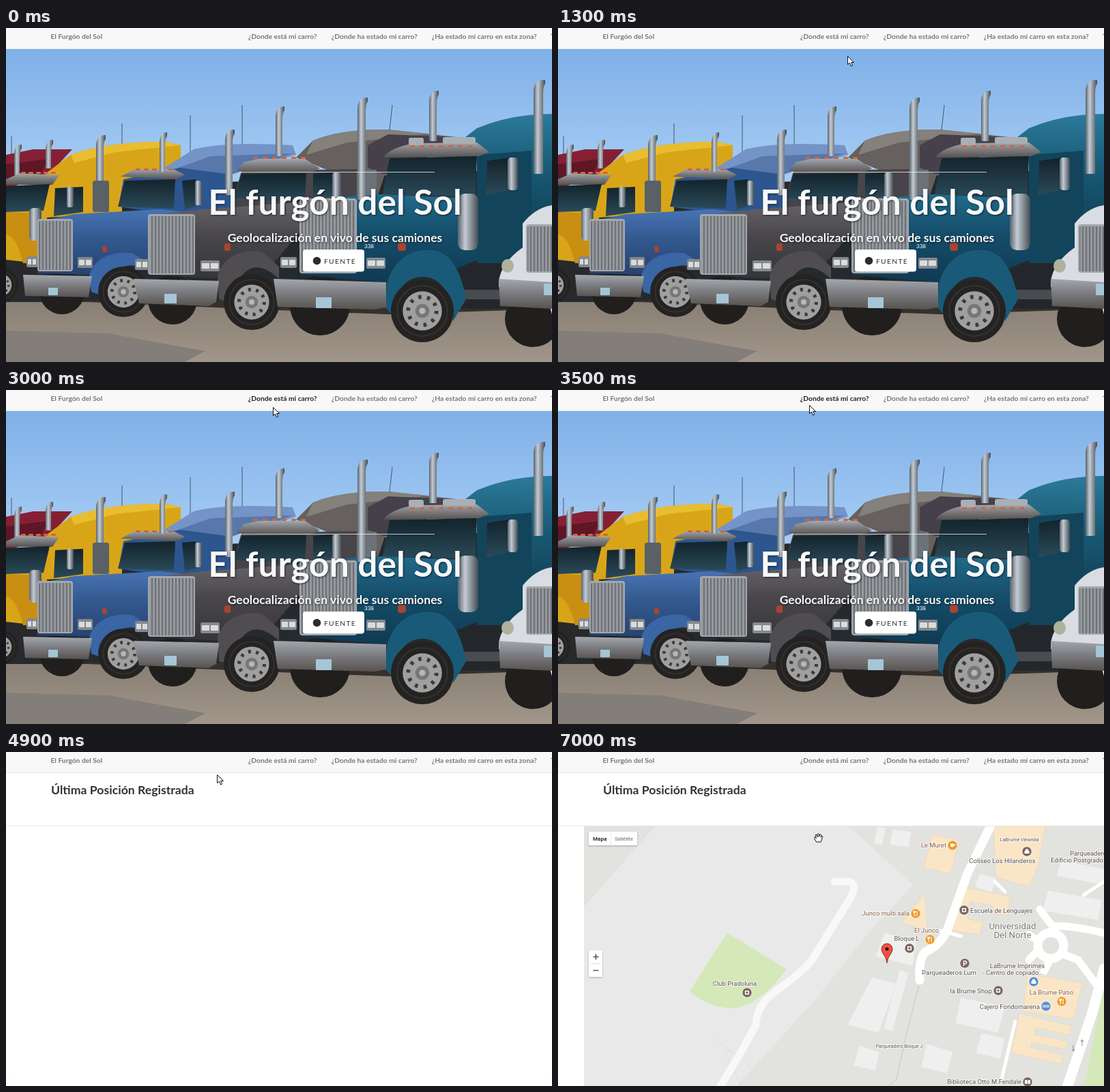
These frames come from a looping animation (800x490 px, 7100 ms). An HTML page:

```html
<!DOCTYPE html>
<html lang="es">
<head>
<meta charset="utf-8">
<title>Geolocalización</title>
<style>
  html, body { margin: 0; width: 100%; height: 100%; overflow: hidden; background: #fff; }
  svg { display: block; }
  text { font-family: Lato, sans-serif; font-weight: 700; }
  .nav text { font-size: 10.25px; fill: #777; }
  .intro { fill: #f8f8f8; text-anchor: middle; filter: drop-shadow(1.5px 1.5px 1.5px rgba(0,0,0,.6)); }
  .ui text { font: 500 8.1px Roboto, sans-serif; }
  .box { fill: #fff; filter: drop-shadow(0 1px 1px rgba(0,0,0,.28)); }
  #labels text { font-family: Roboto, sans-serif; font-weight: 400; paint-order: stroke; stroke: #fff; stroke-width: 2px; stroke-opacity: .75; stroke-linejoin: round; }
  .road { fill: none; stroke: #fff; stroke-linecap: round; stroke-linejoin: round; }
  #cursor path { fill: #fff; stroke: #111; stroke-width: 1; stroke-linejoin: round; }
</style>
</head>
<body>
<svg width="800" height="490" viewBox="0 0 800 490">
  <defs>
    <linearGradient id="sky" x2="0" y2="1">
      <stop stop-color="#7fb0e9"/><stop offset=".45" stop-color="#a3caf2"/><stop offset="1" stop-color="#c2ddf4"/>
    </linearGradient>
    <linearGradient id="soil" x2="0" y2="1">
      <stop stop-color="#857b70"/><stop offset="1" stop-color="#a2968a"/>
    </linearGradient>
    <linearGradient id="pipe">
      <stop stop-color="#59626b"/><stop offset=".35" stop-color="#c3ccd4"/><stop offset="1" stop-color="#454c53"/>
    </linearGradient>
    <linearGradient id="chrome" x2="0" y2="1">
      <stop stop-color="#a3a7ad"/><stop offset=".45" stop-color="#7d7e82"/><stop offset="1" stop-color="#57524f"/>
    </linearGradient>
    <linearGradient id="glass" x2="0" y2="1">
      <stop stop-color="#13232b"/><stop offset="1" stop-color="#2a4a59"/>
    </linearGradient>
    <linearGradient id="blueHood" x2="0" y2="1">
      <stop stop-color="#4873b4"/><stop offset=".45" stop-color="#33598f"/><stop offset="1" stop-color="#28436f"/>
    </linearGradient>
    <linearGradient id="grayHood" x2="0" y2="1">
      <stop stop-color="#66646a"/><stop offset=".45" stop-color="#48464a"/><stop offset="1" stop-color="#363538"/>
    </linearGradient>
    <linearGradient id="tealHood" x2="0" y2="1">
      <stop stop-color="#226b8c"/><stop offset=".45" stop-color="#154d6a"/><stop offset="1" stop-color="#0f3a53"/>
    </linearGradient>
    <linearGradient id="tealRoof" x2="0" y2="1">
      <stop stop-color="#2b7a9a"/><stop offset=".5" stop-color="#185872"/><stop offset="1" stop-color="#123f54"/>
    </linearGradient>
    <pattern id="bars" width="5" height="8" patternUnits="userSpaceOnUse">
      <path fill="#95989d" d="M0 0h5v8H0z"/><path fill="#6d7075" d="M3 0h2v8H3z"/>
    </pattern>
  </defs>

  <g id="home">
    <g id="photo"></g>
    <path d="M342 211.5H628" stroke="#f8f8f8" stroke-opacity=".75"/>
    <text class="intro" x="482" y="274" font-size="51.5">El furgón del Sol</text>
    <text class="intro" x="482" y="314" font-size="17.6">Geolocalización en vivo de sus camiones</text>
    <rect x="435" y="325" width="90" height="32.5" rx="4" fill="#fff"/>
    <circle cx="455.5" cy="341.5" r="5.8" fill="#2d2d2d"/>
    <text x="466" y="346" font-size="10.3" letter-spacing="1.3" style="font-weight:400" fill="#333">FUENTE</text>
  </g>

  <g id="page">
    <path fill="#fff" d="M0 30h800v460H0z"/>
    <text x="66" y="62" font-size="17.66" fill="#333">Última Posición Registrada</text>
    <path d="M0 108.5H800" stroke="#e8e8e8"/>
    <g id="map">
      <path fill="#e5e3df" d="M38 109h762v381H38z"/>
      <svg x="38" y="109" width="762" height="381" viewBox="38 109 762 381">
        <g id="tiles">
          <path fill="#e2e2de" d="M38 109h762v381H38z"/>
          <path fill="#e9e9e9" d="M141 109H426L520 195L455 265L380 360L262 490H38V226Z"/>
          <path fill="#d5e8b8" d="M248 265L335 319Q290 378 250 376Q216 372 193 351ZM800 345V490H771Z"/>
          <g fill="none" stroke="#dededc"><path d="M141 109L38 226M228 420L320 490M245 440L268 490"/></g>
          <g id="blocks"></g>
          <g class="road">
            <path stroke="#f8f8f8" stroke-width="11" d="M405 190H425Q440 192 428 215L372 305Q362 320 320 350Q290 372 290 400Q275 430 238 490"/>
            <path stroke-width="13" d="M636 104L600 178L570 262Q558 285 540 292Q528 300 530 335"/>
            <path stroke-width="15" d="M800 318Q792 350 782 385L745 495"/>
            <path stroke-width="11" d="M706 231L724 255Q760 255 805 267M690 268L705 278M702 292L690 305M738 296L762 305L788 340M720 306L712 322"/>
            <circle cx="722" cy="284" r="19" stroke-width="13"/>
            <path stroke-width="5" d="M800 190L770 210M640 190L655 205M560 262L590 270M670 395L650 480"/>
            <path stroke="#d0d0cd" stroke-width="1.5" d="M529 342L510 415L496 480L485 490"/>
          </g>
          <path d="M755 430v9m-2-3l2 3 2-3M768 431v-9m-2 3l2-3 2 3" fill="none" stroke="#888"/>
        </g>
        <g id="labels"></g>
      </svg>
      <g class="ui">
        <rect class="box" x="45" y="117" width="71" height="20" rx="1.5"/>
        <path d="M77.5 117v20" stroke="#e6e6e6"/>
        <text x="51" y="130" fill="#111">Mapa</text>
        <text x="83" y="130" style="font-weight:400" fill="#666">Satélite</text>
        <rect class="box" x="45" y="291" width="20" height="39" rx="1.5"/>
        <path d="M48 310.5h14" stroke="#e0e0e0"/>
        <path id="zoom" d="M51.5 300.5h8m-4-4v8M51.5 320.5h8" stroke="#555" stroke-width="1.7"/>
      </g>
      <g id="pin">
        <path d="M482 309.5Q481 302 477 297Q474 293 474 289A8 8 0 0 1 490 289Q490 293 487 297Q483 302 482 309.5Z" fill="#f4503e" stroke="#7c2a22" stroke-width=".9"/>
        <circle cx="482" cy="289" r="2.6" fill="#3a1512"/>
      </g>
    </g>
  </g>

  <g class="nav">
    <path fill="#f8f8f8" d="M0 0h800v30H0z"/>
    <path d="M0 30.5H800" stroke="#e7e7e7"/>
    <text x="65.5" y="16">El Furgón del Sol</text>
    <text id="link" x="354.7" y="16">¿Donde está mi carro?</text>
    <text x="476.7" y="16">¿Donde ha estado mi carro?</text>
    <text x="623.7" y="16">¿Ha estado mi carro en esta zona?</text>
    <text x="798" y="16">T</text>
  </g>

  <g id="cursor">
    <path id="arrow" d="M0 0V12L3 9.5L5 14.5L7.2 13.5L5.2 9H9Z"/>
    <path id="hand" d="M0 1.5Q0 0 1.2 0Q2.5 0 2.5 1.5V6Q4 5.3 5 6.6Q6.5 6 7.2 7.4Q9 7 9 9V12L7.6 16.5H1.4L-2.8 11Q-3.2 9.2-1.5 9.4L0 11Z"/>
    <path id="grab" d="M-3 6.5L-6 1Q-6-1.2-4-.3L-3.2 1L-4.4-3Q-4-5-2.5-4L-1.4-1V-5Q-.4-6.7 .8-5V-1L2-4.6Q3.6-5.6 4-3.8L3.6-.2L4.6-2.2Q6.4-2.8 6.2-1L4.5 4L3.5 6.5Z"/>
  </g>
</svg>

<script>
const $ = id => document.getElementById(id);
const shape = (fill, d) => `<path fill="${fill}" d="${d}"/>`;
const rect = (fill, x, y, w, h, r = 0) => `<rect fill="${fill}" x="${x}" y="${y}" width="${w}" height="${h}" rx="${r}"/>`;
const pipe = (x, y, w, h) => rect('url(#pipe)', x, y, w, h, w / 3);
// exhaust with its tip bent backwards
const stack = (x, y, w, h) => shape('url(#pipe)',
  `M${x} ${y + h}V${y + 16}Q${x} ${y} ${x + w + 1} ${y}V${y + 6}Q${x + w - 2} ${y + 9} ${x + w - 2} ${y + 20}V${y + h}Z`);
const chrome = d => shape('url(#chrome)', d);
const glass = d => shape('url(#glass)', d);
const grille = (x, y, w, h) => rect('#a4a8ad', x - 2, y - 3, w + 4, h + 5, 4) + rect('url(#bars)', x, y, w, h, 2);
const lamp = (x, y, w = 26) => rect('#85888c', x, y, w, 16, 2) +
  rect('#d8dcdc', x + 2, y + 4, w / 2 - 3, 8, 1) + rect('#d8dcdc', x + w / 2 + 1, y + 4, w / 2 - 3, 8, 1);
const plate = (x, y, w, h) => rect('#a5c6d6', x, y, w, h, 1);
const beacons = (x, y, n, gap) => Array.from({ length: n }, (_, i) => rect('#d0663a', x + i * gap, y, 7, 3, 1)).join('');
const wheel = (x, y, r) => `<g transform="translate(${x} ${y}) scale(${r / 40})">
  <circle r="40" fill="#242322"/><circle r="32" fill="none" stroke="#33312f" stroke-width="2"/>
  <circle r="25" fill="#a09f9f"/><circle r="18" fill="none" stroke="#3d3b3a" stroke-width="5" stroke-dasharray="4 7.3"/>
  <circle r="9" fill="#77777a"/><circle r="4" fill="#b7b8ba"/></g>`;
const tire = (x, y, r) => `<circle cx="${x}" cy="${y}" r="${r}" fill="#201f1e"/>`;

const backdrop = rect('url(#sky)', 0, 30, 800, 380) + rect('url(#soil)', 0, 390, 800, 100) +
  shape('#837e79', 'M0 444L150 448L292 474L262 490H0Z') +
  shape('#252a2e', 'M0 240L800 205V402H0Z') +
  shape('#35302c', 'M30 400H740V414L560 420L400 414L120 402Z') +
  '<path d="M8 158V190M170 140V190M270 128V205M346 113V205M566 113L558 185" stroke="#45566b" fill="none"/>';

const red = shape('#852034', 'M0 186L40 178H97L62 216L0 236Z') + shape('#5f1626', 'M0 200L62 192L50 216L0 226Z') +
  stack(12, 171, 10, 45) + stack(58, 164, 10, 42);

const yellow = shape('#d9a518', 'M60 212L95 186Q150 166 235 167L256 172V202L170 228V272L60 278V330L45 345L0 340V270Z') +
  shape('#e9bd30', 'M95 186Q150 166 235 167L256 172L160 182L100 198Z') +
  chrome('M0 222L20 213L78 216L68 230H0Z') + beacons(22, 211, 5, 11) +
  glass('M0 232L64 229L55 268L0 270Z') + glass('M72 235L113 233V270L70 276Z') +
  shape('#c98f12', 'M0 270L50 272V345H25Q15 305 0 303Z') + shape('#29292b', 'M0 345H46V394H0Z') +
  wheel(-8, 377, 26) + stack(132, 157, 13, 110) + rect('#596167', 127, 224, 24, 46, 3) + pipe(34, 264, 18, 48) + pipe(89, 233, 10, 30);

const blue = shape('#7494c8', 'M232 205L275 178Q320 166 420 172L425 186L330 215V240H250Z') +
  shape('#5877ab', 'M250 206L300 188L420 184L330 215V240H250Z') +
  shape('#2d568f', 'M165 262L172 222L255 205L330 215V272H230Z') +
  chrome('M168 218L188 207L245 207L262 215L250 222Z') + beacons(190, 206, 5, 12) +
  glass('M174 224L248 222L246 265L164 262Z') + glass('M258 224L278 222V262L262 266Z') + pipe(277, 224, 10, 36) +
  tire(82, 387, 33) +
  shape('url(#blueHood)', 'M46 284L100 273L225 266L262 270L212 310L208 345L190 342Q150 335 130 362L46 360Z') +
  shape('#3a66a6', 'M122 362Q135 326 185 330L210 345V356Q160 330 140 392L125 387Z') +
  wheel(172, 387, 37) + chrome('M25 362L126 364L121 395L28 393Z') + grille(48, 283, 48, 72) +
  lamp(30, 335, 16) + lamp(105, 336, 22) + plate(62, 381, 14, 11) + rect('#a84430', 141, 320, 7, 9, 3) +
  stack(225, 153, 10, 58);

const gray = shape('#66605e', 'M425 190L450 165Q490 148 560 149L660 160L640 180L555 215L545 245H470V208Z') +
  shape('#84807c', 'M450 165Q490 148 560 149L620 155L500 168L440 186Z') +
  shape('#454049', 'M530 172L560 156L655 160L640 180L555 215L530 205Z') +
  shape('#47454a', 'M330 262L345 210L515 207V262H440Z') +
  chrome('M338 210L348 197L370 192H438L460 206L445 213Z') + beacons(362, 189, 6, 14) +
  glass('M345 214L440 213L438 256L335 250Z') + glass('M450 214L478 212V246L450 250Z') + pipe(478, 212, 13, 44) +
  tire(244, 399, 36) +
  shape('url(#grayHood)', 'M210 275L290 266L425 256L470 262L430 300L392 345Q340 335 320 368L210 362Z') +
  shape('#4f4d50', 'M310 362Q325 322 375 328L400 350V368Q350 322 328 402L312 398Z') +
  wheel(360, 402, 41) + chrome('M187 368L312 371L308 402L297 408L195 404Z') + grille(210, 276, 65, 84) +
  lamp(189, 339, 20) + lamp(285, 341, 28) + plate(232, 390, 18, 14) + rect('#a84430', 320, 316, 9, 11, 3) +
  stack(321, 149, 13, 96) + stack(395, 115, 12, 73) + rect('#6b7278', 514, 208, 29, 40, 2);

const teal = shape('url(#tealRoof)', 'M650 178L690 147Q740 126 800 126V262L765 282L690 300V190Z') +
  shape('#12445b', 'M690 186L770 180V345H690Z') +
  chrome('M553 190Q565 174 600 169L690 168L708 182L690 189Z') + beacons(592, 172, 7, 14) +
  rect('#a9afb4', 590, 161, 22, 11, 3) + rect('#a9afb4', 640, 160, 48, 10, 3) +
  glass('M562 191L690 188L688 248L552 244Z') + glass('M705 195L738 190V238L703 246Z') +
  shape('#23272b', 'M655 345H740V412H665Z') + rect('#474c50', 668, 384, 62, 14, 2) +
  tire(460, 407, 44) +
  shape('url(#tealHood)', 'M432 252L550 244L690 250V340L655 355Q600 330 575 375L432 362Z') +
  shape('#195a78', 'M558 374Q575 322 625 326Q662 330 674 398L655 430Q650 365 610 365Q575 365 565 420L556 410Z') +
  wheel(610, 415, 46) + chrome('M392 368L557 373V410L540 413L398 409Z') + grille(432, 253, 80, 105) +
  lamp(402, 336, 24) + lamp(528, 337, 28) + plate(454, 395, 23, 16) + rect('#a84430', 574, 315, 12, 12, 4) +
  pipe(662, 243, 30, 83) + pipe(735, 190, 15, 48) + stack(515, 102, 14, 150) + stack(620, 92, 13, 74) + stack(773, 76, 16, 138) +
  '<text x="525" y="323" font-size="8" fill="#d5e2e8">338</text>';

const white = tire(772, 427, 41) +
  shape('#d9dce2', 'M722 372Q725 345 757 322V287Q775 264 800 260V420L790 385L722 380Z') +
  grille(764, 291, 40, 66) + chrome('M722 368L800 373V412L724 408Z') +
  '<ellipse cx="735" cy="349" rx="9" ry="10" fill="#b0b19c"/>' + plate(788, 375, 14, 17);

$('photo').innerHTML = backdrop + red + yellow + blue + gray + teal + white;

const tan = d => `<path fill="#fae6c6" stroke="#f0d9b4" stroke-width=".7" d="${d}"/>`;
const pale = d => `<path fill="#efefef" stroke="#e2e2e2" stroke-width=".7" d="${d}"/>`;
$('blocks').innerHTML =
  tan('M549 121L587 130L575 179L536 169Z') + tan('M638 109H714L703 168L690 197L642 184Z') +
  tan('M537 208L541 262L504 250Z') +
  tan('M588 198L662 212L658 240L640 237L636 225L604 220L600 245L622 250L618 268L575 261Z') +
  tan('M688 325L768 340L755 392L682 380Z') +
  tan('M676 384L752 402L749 415L700 404L697 414L746 425L743 436L694 426L692 433L740 445L737 457L664 441Z') +
  pale('M468 109L480 112L475 137L463 134Z') + pale('M490 113L518 117L514 140L486 136Z') +
  pale('M617 178L642 185L636 206L611 198Z') + pale('M478 265L525 278L520 314L465 300Z') +
  pale('M460 330L496 340L470 412L424 400Z') + pale('M500 320L514 324L490 410L477 406Z') +
  pale('M540 428L579 440L570 472L532 462Z') + pale('M441 430L471 440L465 468L433 460Z') +
  pale('M738 158L800 172V195L730 182Z') + pale('M718 203L797 217L792 247L710 233Z') +
  pale('M590 360L655 374L645 412L582 398Z') + pale('M620 412L655 420L648 450L612 442Z');

const brown = '#7b6762', orange = '#ee9a2b', azure = '#5b8fd4';
const glyphs = {
  square: '<path d="M-2.3-2.3h4.6v4.6h-4.6z" stroke="#fff" stroke-width="1.5" fill="none"/>',
  fork: '<path d="M-1.8-4V4M2-4V4M-3.2-4v2.5h2.8V-4" stroke="#fff" stroke-width="1.1" fill="none"/>',
  cup: '<path d="M-3-2.5h5v3.5q-2.5 3-5 0zM2-1.5h2v2h-2" fill="#fff"/>',
  box: '<path d="M-3.5-1h7v4h-7zM-2-3.5h4V-1h-4z" fill="#fff"/>',
  park: '<path d="M-1.5 4V-3.2H.6q2 0 2 2t-2 2H-1.5" stroke="#fff" stroke-width="1.4" fill="none"/>',
  book: '<path d="M-4-2.5Q-2-3.5-.4-2.3V3Q-2 2-4 3zM4-2.5Q2-3.5 .4-2.3V3Q2 2 4 3z" fill="#fff"/>',
  cash: '<path d="M-4 2V-2M-2-2V2M0-2V2M2-2V2M4-2V2" stroke="#fff"/>'
};
const poi = (x, y, color, glyph) => `<g transform="translate(${x} ${y})"><circle r="7.2" fill="${color}" stroke="#fff" stroke-width=".8"/>${glyphs[glyph]}</g>`;
const label = (text, x, y, anchor = 'start', size = 9.5, fill = '#5c5050') =>
  `<text x="${x}" y="${y}" text-anchor="${anchor}" font-size="${size}" fill="${fill}">${text}</text>`;
const food = '#8a5c44', area = '#777';
$('labels').innerHTML =
  poi(578, 137, orange, 'cup') + poi(524, 237, orange, 'fork') + poi(545, 275, orange, 'fork') + poi(738, 366, orange, 'fork') +
  poi(687, 146, brown, 'box') + poi(595, 232, brown, 'square') + poi(515, 288, brown, 'square') + poi(596, 310, brown, 'park') +
  poi(645, 350, brown, 'square') + poi(277, 353, brown, 'square') + poi(688, 484, brown, 'book') +
  poi(697, 337, azure, 'box') + poi(715, 373, azure, 'cash') +
  label('Le Muret', 569, 140, 'end', 9.5, food) + label('LaBrume Véranda', 676, 131, 'middle', 7.2) +
  label('Coliseo Los Hilanderos', 651, 163, 'middle') +
  label('Parqueadero', 750, 152) + label('Edificio Postgrado', 722, 162) +
  label('Junco multi sala', 515, 240, 'end', 9.5, food) + label('El Junco', 540, 265, 'middle', 9.5, food) +
  label('Bloque L', 511, 277, 'middle') + label('Escuela de Lenguajes', 604, 236) +
  label('Universidad', 666, 260, 'middle', 13.2, area) + label('Del Norte', 666, 273, 'middle', 13.2, area) +
  label('Parqueaderos Lum', 573, 327, 'middle') + label('LaBrume Imprimés', 673, 317, 'middle') +
  label('- Centro de copiado...', 667, 327, 'middle') + label('la Brume Shop', 636, 354, 'end') +
  label('La Brume Patio', 723, 356, 'middle', 9.5, food) + label('Cajero Fondomarena', 706, 377, 'end') +
  label('Club Pradoluna', 259, 343, 'middle') + label('Parqueadero Bloque J', 500, 434, 'middle', 7) +
  label('Biblioteca Otto M.Fendale', 679, 487, 'end');

const LOOP = 7100, STEP = 100;
// time, x, y of the pointer tip
const track = [
  [300, 560, 300], [800, 430, 117], [1500, 422, 22], [1900, 420, 19], [3000, 391, 25],
  [3800, 358, 20], [4300, 356, 19], [4800, 320, 32], [5600, 60, 58], [5900, 50, 68], [6400, 50, 62], [7000, 381, 125]
];
const pointers = [[0, 'arrow'], [1500, 'hand'], [2700, 'arrow'], [3800, 'hand'], [4800, 'arrow'], [6900, 'grab']];

function position(t) {
  const i = track.findIndex(k => k[0] > t);
  if (i < 1) return track[i ? track.length - 1 : 0].slice(1);
  const [a, b] = [track[i - 1], track[i]];
  const u = (t - a[0]) / (b[0] - a[0]), e = u * u * (3 - 2 * u);
  return [a[1] + (b[1] - a[1]) * e, a[2] + (b[2] - a[2]) * e];
}

const show = (id, on) => $(id).style.display = on ? '' : 'none';

function draw(ms) {
  const t = Math.floor(ms % LOOP / STEP) * STEP;
  show('home', t < 3700);
  show('page', t >= 3700);
  show('map', t >= 5100);
  show('pin', t >= 5500);
  $('tiles').style.opacity = Math.min(1, Math.max(0, (t - 6100) / 300));
  show('labels', t >= 6500);
  show('zoom', t >= 6500);
  $('link').style.fill = t >= 1500 && t < 4900 ? '#222' : '';

  const kind = pointers.filter(p => p[0] <= t).pop()[1];
  for (const id of ['arrow', 'hand', 'grab']) show(id, id === kind);
  show('cursor', t >= 300);
  $('cursor').setAttribute('transform', `translate(${position(t).map(v => Math.round(v) + .5)})`);
}

const start = performance.now();
function tick() {
  draw(performance.now() - start);
  requestAnimationFrame(tick);
}
tick();
</script>
</body>
</html>
```
